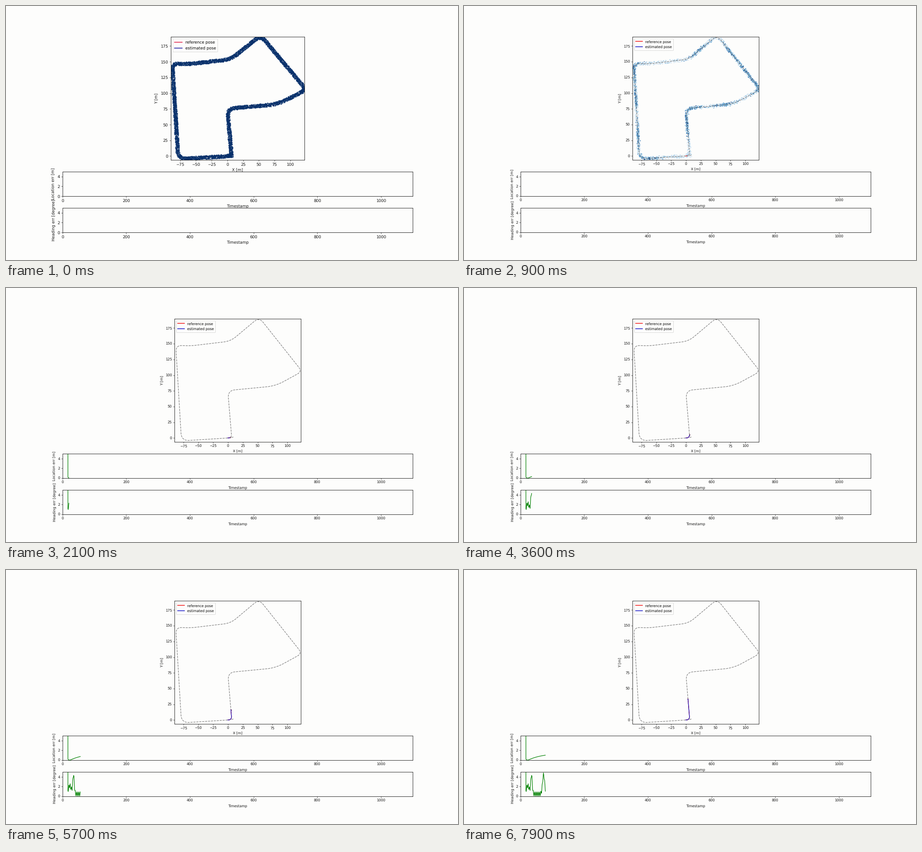
Animation, 998 px wide and 561 px high, one loop 8000 ms. Source, as a matplotlib script:

```python
import numpy as np
import matplotlib.pyplot as plt
from matplotlib.animation import FuncAnimation

W, H, DPI = 998, 561, 64
PT = 72 / DPI            # points per pixel
FRAMES, STEP = 80, 100
LOCK = 18                # step at which the filter locks on
BG, INK = "#fdfdfc", "#141414"

plt.rcParams.update({
    "font.family": "DejaVu Sans",
    "text.hinting": "none",
    "axes.facecolor": BG,
    "axes.edgecolor": INK,
    "axes.linewidth": 0.9 * PT,
})

# Route corners in metres: x, y, length trimmed off each side for rounding
CORNERS = [
    (-0.4, 0.1, 0), (6.3, 0.6, 5.5), (-0.4, 75.6, 12), (80, 82.8, 16),
    (124.9, 105.9, 9), (52.5, 192.1, 11), (4.8, 154.2, 12), (-62, 146.6, 10),
    (-88, 147.4, 10), (-78.4, -4.5, 13), (0, 0.1, 3), (9.2, 1.6, 0)]

# Distances along the route where particles gather
HOT = [50, 82, 140, 210, 235, 280, 350, 470, 515, 575, 620]


def lengths(p):
    return np.r_[0, np.cumsum(np.hypot(*np.diff(p, axis=0).T))]


def rounded(corners, count=2500):
    """Polyline with rounded corners, evenly sampled."""
    p, cut = np.array(corners)[:, :2], np.array(corners)[:, 2]
    v = np.linspace(0, 1, 15)[:, None]
    parts = [p[:1]]
    for a, b, c, d in zip(p, p[1:], p[2:], cut[1:]):
        start = b + (a - b) * d / np.hypot(*(a - b))
        end = b + (c - b) * d / np.hypot(*(c - b))
        parts.append((1 - v)**2 * start + 2 * v * (1 - v) * b + v**2 * end)
    q = np.vstack(parts + [p[-1:]])
    t = lengths(q)
    u = np.linspace(0, t[-1], count)
    return np.c_[np.interp(u, t, q[:, 0]), np.interp(u, t, q[:, 1])]


path = rounded(CORNERS)
arc = lengths(path)
tangent = np.gradient(path, arc, axis=0)


def on_path(s, side=0):
    x, y = (np.interp(s, arc, path[:, k]) for k in (0, 1))
    tx, ty = (np.interp(s, arc, tangent[:, k]) for k in (0, 1))
    return np.c_[x - side * ty, y + side * tx]


def travelled(n):
    return 1.5 + 0.0145 * n + 0.0057 * n * n


def trail(s):
    return path[arc <= s].T


def bump(t, mid, width):
    return np.exp(-((t - mid) / width)**2 / 2)


# Errors start far off the scale, then settle
times = np.arange(LOCK - 2, FRAMES - 1)
drift = 1 - np.exp(-np.maximum(times - 24, 0) / 45)
loc_err = 0.03 + 0.27 * np.exp(-(times - 17) / 1.2) + 1.43 * drift
head_err = np.abs(0.5 + 1.7 * bump(times, 23, 4.5) + 3.8 * bump(times, 34.5, 2.4)
                  + 3.9 * bump(times, 72.5, 3.3)
                  + 0.42 * np.sin(np.pi / 2 * (times - 19)))
loc_err[0] = head_err[0] = 100

rng = np.random.default_rng(4)
WIDE, NEAR = 6500, 1300
wide_s = rng.uniform(0, arc[-1], WIDE)
wide_side = rng.uniform(-2.9, 2.9, WIDE)
wide_tone = 0.17 + 0.28 * rng.random(WIDE)**2
near_s = rng.choice(HOT, NEAR) + rng.normal(0, 12, NEAR)
near_side = rng.normal(0, 1.2, NEAR)
near_tone = 0.4 + 0.6 * rng.random(NEAR)**1.3


def particles(n):
    """Positions and colours of the particle cloud at step n."""
    if n == 0:
        return on_path(wide_s, wide_side), "#08306b"
    if n > LOCK:
        return np.empty((0, 2)), "none"
    r = np.random.default_rng(100 + n)
    k = 2500 - 45 * n
    s = np.r_[wide_s[:k], near_s] + travelled(n) - travelled(1)
    side = np.r_[wide_side[:k], near_side]
    tone = np.r_[wide_tone[:k], near_tone] + r.normal(0, 0.05, s.size)
    s = s + r.normal(0, 0.3, s.size)
    side = side + r.normal(0, 0.2, s.size)
    return on_path(np.clip(s, 0, arc[-1]), side), plt.cm.Blues(np.clip(tone, 0.12, 1))


fig = plt.figure(figsize=(W / DPI, H / DPI), dpi=DPI, facecolor=BG)
grid = fig.add_gridspec(3, 1, height_ratios=(5, 1, 1), hspace=0.2, left=0.125,
                        right=0.9, top=1 - 68.1 / H, bottom=1 - 500.1 / H)


class View:
    """The three plots at one text size and map aspect."""

    def __init__(self, aspect, size, side_size, red, blue, dash_z, dot):
        self.size, self.side_size = size * PT, side_size * PT
        self.unit = side_size / 10 * PT
        lw = 1.5 * self.unit
        self.map = ax = self.axes(0, "X [m]", "Y [m]", (-90.1, 122.7), (-6.4, 189.6),
                                  range(-75, 101, 25), range(0, 176, 25))
        ax.set_aspect(aspect)
        self.cloud = ax.scatter([], [], s=(dot * PT)**2, linewidths=0, zorder=2)
        ax.plot(*path.T, "--", color="gray", lw=lw, zorder=dash_z)
        self.ref, = ax.plot([], [], color=red, lw=lw, zorder=4, label="reference pose")
        self.est, = ax.plot([], [], color=blue, lw=lw, zorder=5, label="estimated pose")
        self.tip, = ax.plot([], [], "o", color="#50102c", ms=2.2 * PT, mew=0, zorder=4.5)
        legend = ax.legend(loc="upper left", fontsize=self.size, labelspacing=0.53,
                           edgecolor="0.8")
        legend.set_zorder(6)
        for line in legend.get_lines():
            line.set_linewidth(1.5 * PT)
        self.loc = self.error(1, "Location err [m]", lw)
        self.head = self.error(2, "Heading err [degree]", lw)

    def axes(self, row, xlabel, ylabel, xlim, ylim, xticks, yticks):
        # The label keeps the two views' axes distinct
        ax = fig.add_subplot(grid[row], label=f"{row} {self.size}")
        ax.set(xlim=xlim, ylim=ylim, xticks=xticks, yticks=yticks)
        u = self.unit
        ax.tick_params(labelsize=self.size, length=3.5 * u, pad=3.5 * u,
                       width=0.8 * u, color=INK, labelcolor=INK)
        ax.set_xlabel(xlabel, fontsize=self.size, labelpad=4 * u, color=INK)
        ax.set_ylabel(ylabel, fontsize=self.side_size, labelpad=4 * u, color=INK)
        return ax

    def error(self, row, label, lw):
        ax = self.axes(row, "Timestamp", label, (0, 1100), (0, 5),
                       range(0, 1001, 200), (0, 2, 4))
        return ax.plot([], [], color="green", lw=lw)[0]

    def show(self, on):
        for ax in (self.map, self.loc.axes, self.head.axes):
            ax.set_visible(on)

    def draw(self, n):
        spots, tones = particles(n)
        self.cloud.set_offsets(spots)
        self.cloud.set_facecolor(tones)
        s = travelled(n)
        locked = n >= LOCK
        self.ref.set_data(*(trail(s) if n else ([], [])))
        self.est.set_data(*(trail(s - 0.5) if locked else ([], [])))
        self.tip.set_data(*(on_path([s - 0.3]).T if locked else ([], [])))
        seen = times <= n - 1
        self.loc.set_data(times[seen], loc_err[seen])
        self.head.set_data(times[seen], head_err[seen])


first = View(1, 8.7, 8.7, "#dd1440", "#0c0c9c", 1, 2.1)
later = View(1.06, 7.6, 8.13, "#f01010", "#1010c8", 3, 1.7)


def update(n):
    first.show(n == 0)
    later.show(n > 0)
    (later if n else first).draw(n)
    return []


anim = FuncAnimation(fig, update, frames=FRAMES, interval=STEP, repeat=True)
plt.show()
```
